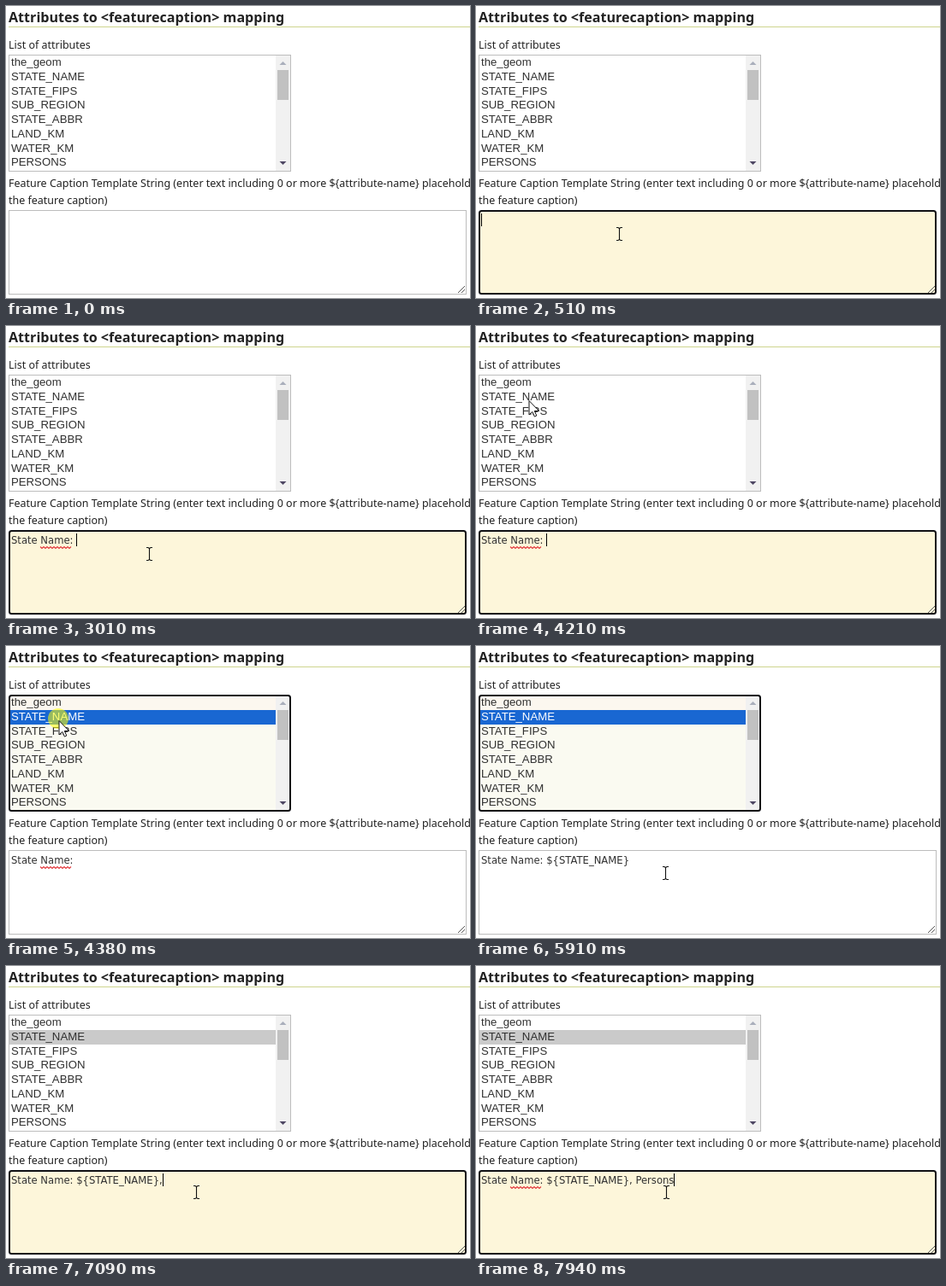
These frames come from a looping animation (542 px wide and 342 px high, 8 s). An HTML page:

```html
<!DOCTYPE html>
<html lang="en">
<head>
<meta charset="utf-8">
<title>Attribute mapping form</title>
<style>
  html, body { margin: 0; width: 100%; height: 100%; overflow: hidden; background: #fff; }
  svg { display: block; }
  text { font: 12.47px "Noto Sans", sans-serif; fill: #222; white-space: pre; }
  .heading { font-size: 16.1px; font-weight: bold; }
  #rows text { font: 13.2px "Liberation Sans", Arial, sans-serif; fill: #303030; }
  #typed { font: 11.6px "DejaVu Sans", sans-serif; fill: #303030; }
  .outline { fill: none; }
</style>
</head>
<body>
<svg width="542" height="342" viewBox="0 0 542 342">
  <text class="heading" x="3" y="19">Attributes to &lt;featurecaption&gt; mapping</text>
  <path d="M3 24.5H542" stroke="#cdd58e"/>
  <text x="3" y="50">List of attributes</text>

  <rect id="listFill" x="4" y="58" width="328" height="135"/>
  <rect id="firstRow" x="5" y="59" width="310" height="16" fill="#fcf7ef"/>
  <rect id="selection" x="4" y="75" width="311" height="17"/>
  <g id="rows"></g>
  <rect x="315" y="58" width="17" height="135" fill="#f1f1f1"/>
  <rect x="317" y="75" width="13" height="35" fill="#c1c1c1"/>
  <path d="M319.5 69l4-4 4 4z" fill="#a9aebb"/>
  <path d="M319.5 182l4 4 4-4z" fill="#4d4663"/>
  <rect id="listBorder" class="outline"/>

  <text x="3" y="212">Feature Caption Template String (enter text including 0 or more ${attribute-name} placeholder values) for</text>
  <text x="3" y="232">the feature caption)</text>

  <rect id="areaFill" x="4" y="240" width="533" height="97"/>
  <path d="M528 336l8-8M532 336l4-4" stroke="#555"/>
  <rect id="areaBorder" class="outline"/>
  <text id="typed" x="6" y="255"></text>
  <path id="squiggle" class="outline" stroke="#e2383d" stroke-width="1.1"/>
  <rect id="caret" y="243" width="1" height="15" fill="#000"/>

  <circle id="click" r="12" fill="#ff0"/>
  <path id="arrow" d="M0 0V16.5L3.8 13 6.4 18.6 8.8 17.5 6.3 12H11.6Z" fill="#fff" stroke="#111"/>
  <path id="beam" class="outline" d="M-3 -7.5H-1L.5 -6.5 2 -7.5H4M.5 -6.5V6.5M-3 7.5H-1L.5 6.5 2 7.5H4" stroke="#111" stroke-width="1.1"/>
</svg>
<script>
const LOOP = 8000;
const $ = id => document.getElementById(id);
const set = (id, attributes) => {
  for (const key in attributes) $(id).setAttribute(key, attributes[key]);
};
const show = (id, visible) => set(id, { visibility: visible ? 'visible' : 'hidden' });

const names = ['the_geom', 'STATE_NAME', 'STATE_FIPS', 'SUB_REGION', 'STATE_ABBR', 'LAND_KM', 'WATER_KM', 'PERSONS'];
const rows = names.map((name, i) => {
  const row = document.createElementNS('http://www.w3.org/2000/svg', 'text');
  row.setAttribute('x', 6);
  row.setAttribute('y', Math.round(70.2 + 16.75 * i));
  row.textContent = name;
  $('rows').append(row);
  return row;
});
set('squiggle', { d: 'M40 258.5' + 'l2 2l2 -2'.repeat(9) });

const start = { focus: '', text: '', caret: false, squiggle: false, selected: false, click: null, pointer: '', at: [0, 0] };
const filled = 'State Name: ${STATE_NAME}';

// Each step changes only the listed parts of the state.
const steps = [
  [170, { pointer: 'beam', at: [167, 267] }],
  [340, { focus: 'area', caret: true, click: [166, 266, .75] }],
  [510, { click: null }],
  [670, { text: 'S' }],
  [1000, { text: 'Sta' }],
  [1330, { text: 'State ' }],
  [1830, { text: 'State N' }],
  [2000, { text: 'State Na' }],
  [2170, { text: 'State Name' }],
  [2340, { text: 'State Name:' }],
  [2840, { caret: false }],
  [3010, { text: 'State Name: ', caret: true, squiggle: true }],
  [3360, { at: [161, 258] }],
  [3530, { pointer: 'arrow', at: [137, 207], caret: false }],
  [3700, { at: [102, 150] }],
  [3870, { at: [76, 109] }],
  [4040, { at: [65, 93], caret: true }],
  [4210, { at: [62, 87.5] }],
  [4380, { focus: 'list', selected: true, caret: false, click: [61, 85, .55] }],
  [4550, { click: null }],
  [5050, { text: filled, squiggle: false }],
  [5400, { at: [73, 100] }],
  [5570, { at: [130, 168] }],
  [5740, { pointer: 'beam', at: [200, 248] }],
  [5910, { at: [221, 266] }],
  [6080, { focus: 'area', caret: true, at: [222, 265], click: [220, 264, .75] }],
  [6250, { click: null }],
  [6770, { caret: false }],
  [7090, { text: filled + ',', caret: true }],
  [7260, { text: filled + ', ', squiggle: true }],
  [7430, { text: filled + ', P' }],
  [7600, { text: filled + ', Per' }],
  [7770, { text: filled + ', Perso' }],
  [7940, { text: filled + ', Persons' }]
];

function drawBorder(id, x, y, width, height, focused) {
  const inset = focused ? 1 : .5;
  set(id, {
    x: x + inset, y: y + inset, width: width - 2 * inset, height: height - 2 * inset,
    rx: focused ? 2.5 : 0, stroke: focused ? '#101014' : '#bdbdbd', 'stroke-width': 2 * inset
  });
}

function draw(time) {
  const state = Object.assign({}, start, ...steps.filter(step => step[0] <= time).map(step => step[1]));
  const inList = state.focus === 'list', inArea = state.focus === 'area';

  set('listFill', { fill: inList ? '#fafaf1' : '#fff' });
  show('firstRow', inList);
  show('selection', state.selected);
  set('selection', { fill: inList ? '#1967d2' : '#cacaca' });
  rows[1].style.fill = inList ? '#fff' : '';
  drawBorder('listBorder', 3, 57, 330, 137, inList);

  set('areaFill', { fill: inArea ? '#fdf6da' : '#fff' });
  drawBorder('areaBorder', 3, 239, 535, 99, inArea);
  $('typed').textContent = state.text;
  show('squiggle', state.squiggle);
  show('caret', state.caret);
  set('caret', { x: Math.round(6 + (state.text ? $('typed').getComputedTextLength() : 0)) });

  show('click', state.click);
  if (state.click) {
    const [cx, cy, opacity] = state.click;
    set('click', { cx, cy, opacity });
  }
  for (const id of ['arrow', 'beam']) {
    show(id, state.pointer === id);
    set(id, { transform: `translate(${state.at})` });
  }
}

const origin = performance.now();
function tick() {
  draw((performance.now() - origin) % LOOP);
  requestAnimationFrame(tick);
}
tick();
</script>
</body>
</html>
```
